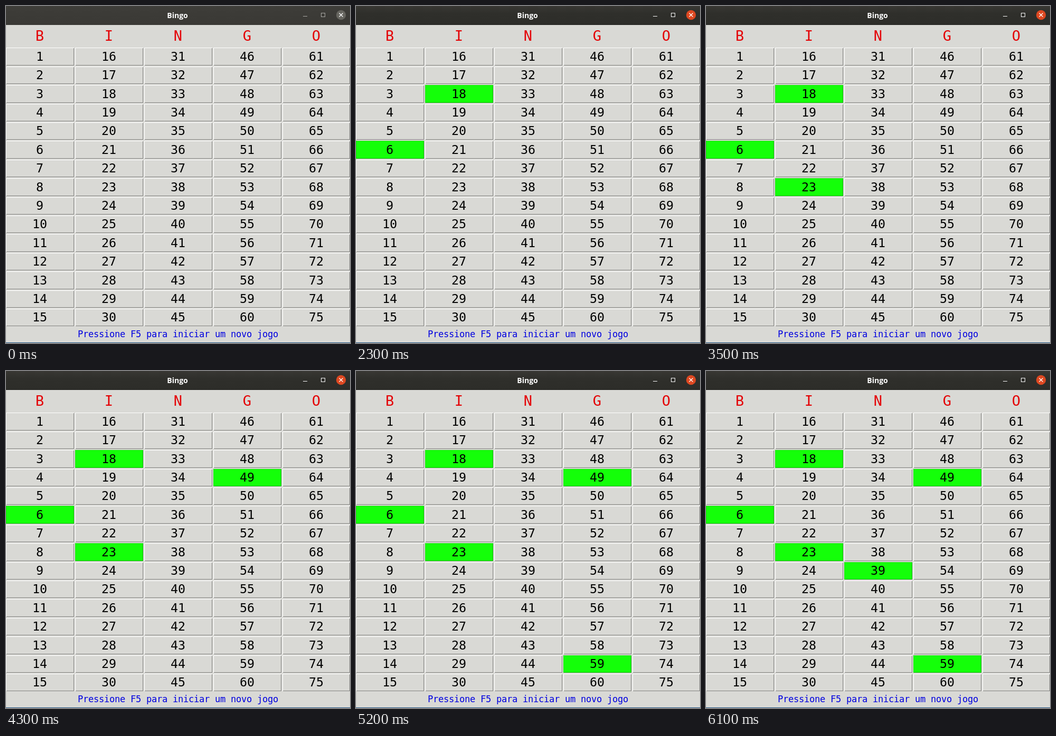
An HTML page with a canvas for the animation above (8000 ms loop, 652 by 640 pixels).

```html
<!DOCTYPE html>
<html lang="pt">
<head>
<meta charset="utf-8">
<title>Bingo</title>
<style>
html, body { margin: 0; overflow: hidden; }
canvas { display: block; }
</style>
</head>
<body>
<canvas id="stage" width="652" height="640"></canvas>
<script>
const LOOP = 8000;
const FOCUS_TIME = 1300;
const MONO = '"DejaVu Sans Mono", monospace';
const PAPER = '#d9d9d5';
// number drawn -> time it is marked
const DRAWN = { 18: 1300, 6: 2300, 23: 3300, 49: 4100, 59: 5000, 39: 6000 };

const ctx = document.getElementById('stage').getContext('2d');

function rect(x, y, w, h, color) {
  ctx.fillStyle = color;
  ctx.fillRect(x, y, w, h);
}

function label(text, x, y, font, color, spacing = 0) {
  ctx.font = font;
  ctx.letterSpacing = spacing + 'px';
  ctx.fillStyle = color;
  ctx.textAlign = 'center';
  ctx.fillText(text, x, y);
}

function titleBar(focused) {
  const shade = ctx.createLinearGradient(0, 0, 0, 36);
  shade.addColorStop(0, focused ? '#383733' : '#3f3e3a');
  shade.addColorStop(0.4, focused ? '#2f2f2b' : '#3c3b37');
  shade.addColorStop(1, focused ? '#2d2d29' : '#3a3935');
  rect(0, 0, 652, 36, shade);
  rect(0, 35, 652, 1, focused ? '#20201d' : '#353430');
  label('Bingo', 325, 23, 'bold 14px "Open Sans", "Noto Sans", sans-serif', '#ffffff');

  const icon = focused ? '#ffffff' : '#aaa9a5';
  rect(563, 19, 8, 1, icon);
  ctx.lineWidth = 1;
  ctx.strokeStyle = icon;
  ctx.strokeRect(597.5, 13.5, 7, 7);

  ctx.fillStyle = focused ? '#dd4821' : '#66655f';
  ctx.beginPath();
  ctx.arc(635, 17, 9.2, 0, 7);
  ctx.fill();
  ctx.strokeStyle = '#ffffff';
  ctx.lineWidth = 1.3;
  ctx.beginPath();
  ctx.moveTo(631.5, 13.5);
  ctx.lineTo(638.5, 20.5);
  ctx.moveTo(638.5, 13.5);
  ctx.lineTo(631.5, 20.5);
  ctx.stroke();
}

function cell(number, marked) {
  const col = Math.floor((number - 1) / 15);
  const offset = (number - 1) % 15 * 35.4;
  const x = col * 131;
  const y = Math.round(79.4 + offset);
  const w = Math.min(129, 652 - x);
  const h = Math.round(112.8 + offset) - y;
  const [face, light, dark] = marked
    ? ['#14ff09', '#18e60c', '#0cb304']
    : [PAPER, '#ffffff', '#828280'];
  rect(x, y, w, h, light);
  rect(x + 1, y + 1, w - 1, h - 1, dark);
  rect(x + 1, y + 1, w - 2, h - 2, face);
  label(number, x + 64, Math.round(95.8 + offset) + 8, '23.25px ' + MONO, '#000000');
}

function draw(now) {
  const t = now % LOOP;
  rect(0, 0, 652, 640, PAPER);
  titleBar(t >= FOCUS_TIME);
  [...'BINGO'].forEach((letter, i) =>
    label(letter, 64 + i * 131, 66, '27px ' + MONO, '#e40004'));
  for (let n = 1; n <= 75; n++) cell(n, t >= DRAWN[n]);
  label('Pressione F5 para iniciar um novo jogo', 326, 629, '17px ' + MONO, '#0000e0', -0.234);
  rect(0, 639, 652, 1, '#1c4f80');
  requestAnimationFrame(draw);
}

requestAnimationFrame(draw);
</script>
</body>
</html>
```
